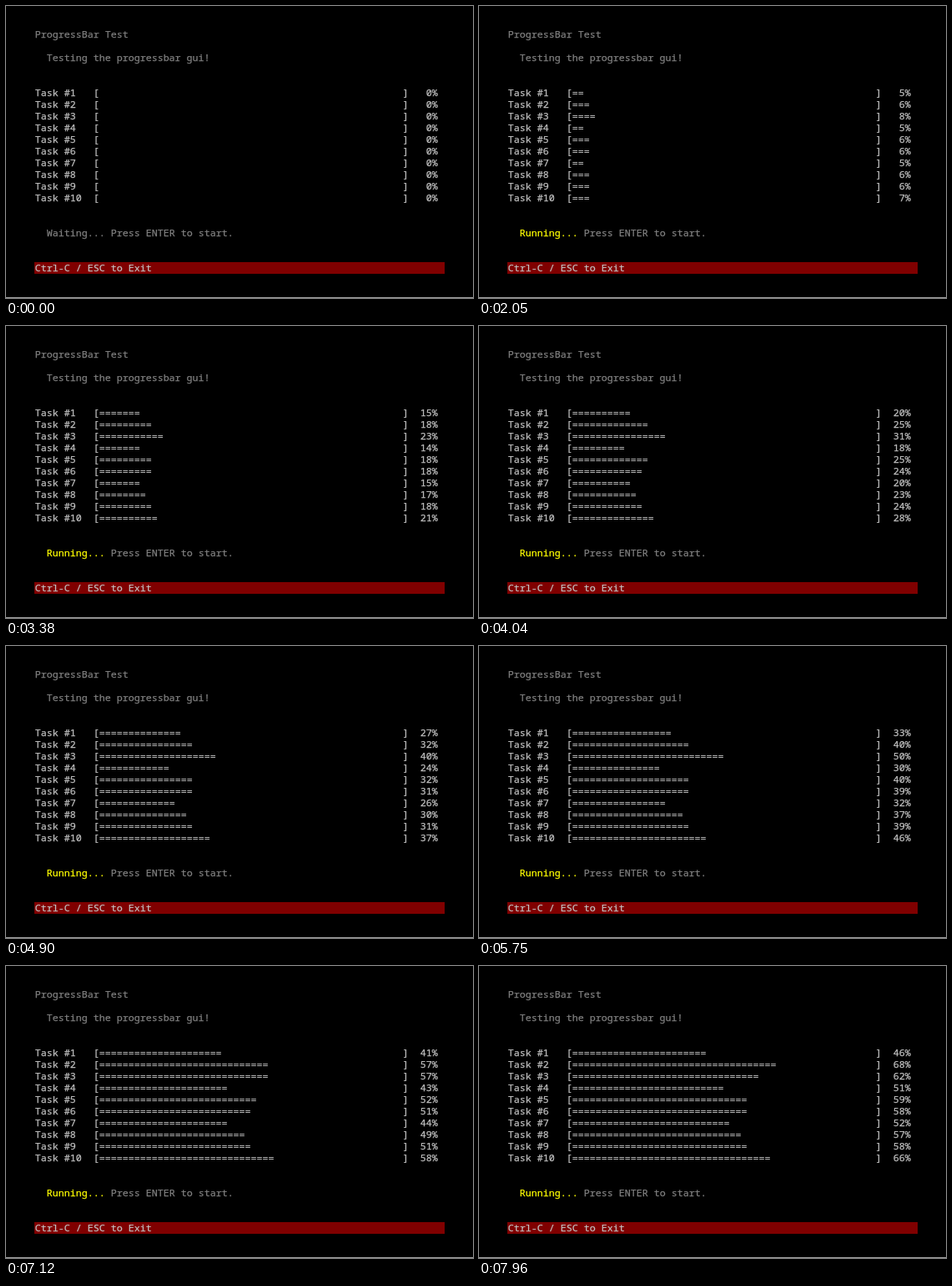
Write an HTML page with a canvas that moves like this. It is 560 by 350 pixels and loops after 8 s.

```html
<!DOCTYPE html>
<html lang="en">
<head>
<meta charset="utf-8">
<title>Progress bars</title>
<style>
html, body { margin: 0; width: 560px; height: 350px; overflow: hidden; background: #000; }
canvas { display: block; }
</style>
</head>
<body>
<canvas id="stage" width="560" height="350"></canvas>
<script>
const ctx = document.getElementById('stage').getContext('2d');
const LOOP = 8000, START = 1380, MIDDLE = 5750, END = 7960, TICK = 47.3;
const LEFT = 34.75, TOP = 38, CELL = 7, LINE = 14, BAR = 52;
const GREY = '#c0c0c0', DIM = '#808080', YELLOW = '#ffff00', RED = '#800000';

// Each task runs at one pace up to the middle and at another up to the end.
const middle = [33, 40, 50, 30, 40, 39, 32, 37, 39, 46];
const end = [46, 68, 62, 51, 59, 58, 52, 57, 58, 66];

// Share of the way from t0 to t1, advancing in whole ticks.
function share(t, t0, t1) {
  const steps = Math.round((t1 - t0) / TICK);
  const u = Math.min(1, Math.max(0, (t - t0) / (t1 - t0)));
  return Math.floor(u * steps) / steps;
}

function percent(task, t) {
  const first = share(t, START - TICK, MIDDLE);
  const second = share(t, MIDDLE, END);
  return Math.round(middle[task] * first + (end[task] - middle[task]) * second);
}

function print(text, col, row, color) {
  const x = LEFT + col * CELL, y = TOP + row * LINE;
  ctx.fillStyle = ctx.strokeStyle = color;
  ctx.fillText(text, x, y);
  ctx.strokeText(text, x, y);
}

function rect(x, y, w, h, color) {
  ctx.fillStyle = color;
  ctx.fillRect(x, y, w, h);
}

function drawTask(i, p) {
  const row = 5 + i;
  print('Task #' + (i + 1), 0, row, GREY);
  print('[' + '='.repeat(Math.floor(p * BAR / 100)), 10, row, GREY);
  print(']', 11 + BAR, row, GREY);
  print(String(p).padStart(3) + '%', 65, row, GREY);
}

function draw(t) {
  rect(0, 0, 560, 350, '#000');
  rect(0, 349, 560, 1, '#a0a0a0');
  ctx.font = '11.667px "Noto Sans Mono", "DejaVu Sans Mono", monospace';
  ctx.lineWidth = 0.25; // slightly heavier strokes
  ctx.lineJoin = 'round';

  print('ProgressBar Test', 0, 0, DIM);
  print('Testing the progressbar gui!', 2, 2, DIM);
  for (let i = 0; i < end.length; i++) drawTask(i, percent(i, t));

  const running = t >= START;
  print(running ? 'Running...' : 'Waiting...', 2, 17, running ? YELLOW : DIM);
  print('Press ENTER to start.', 13, 17, DIM);

  rect(34, 307, 492, 14, RED);
  print('Ctrl-C / ESC to Exit', 0, 20, GREY);
  if (t >= 500 && t < 1060) rect(525, 317, 1, 4, GREY); // cursor blink
}

const begin = performance.now();
function frame() {
  draw((performance.now() - begin) % LOOP);
  requestAnimationFrame(frame);
}
frame();
</script>
</body>
</html>
```
